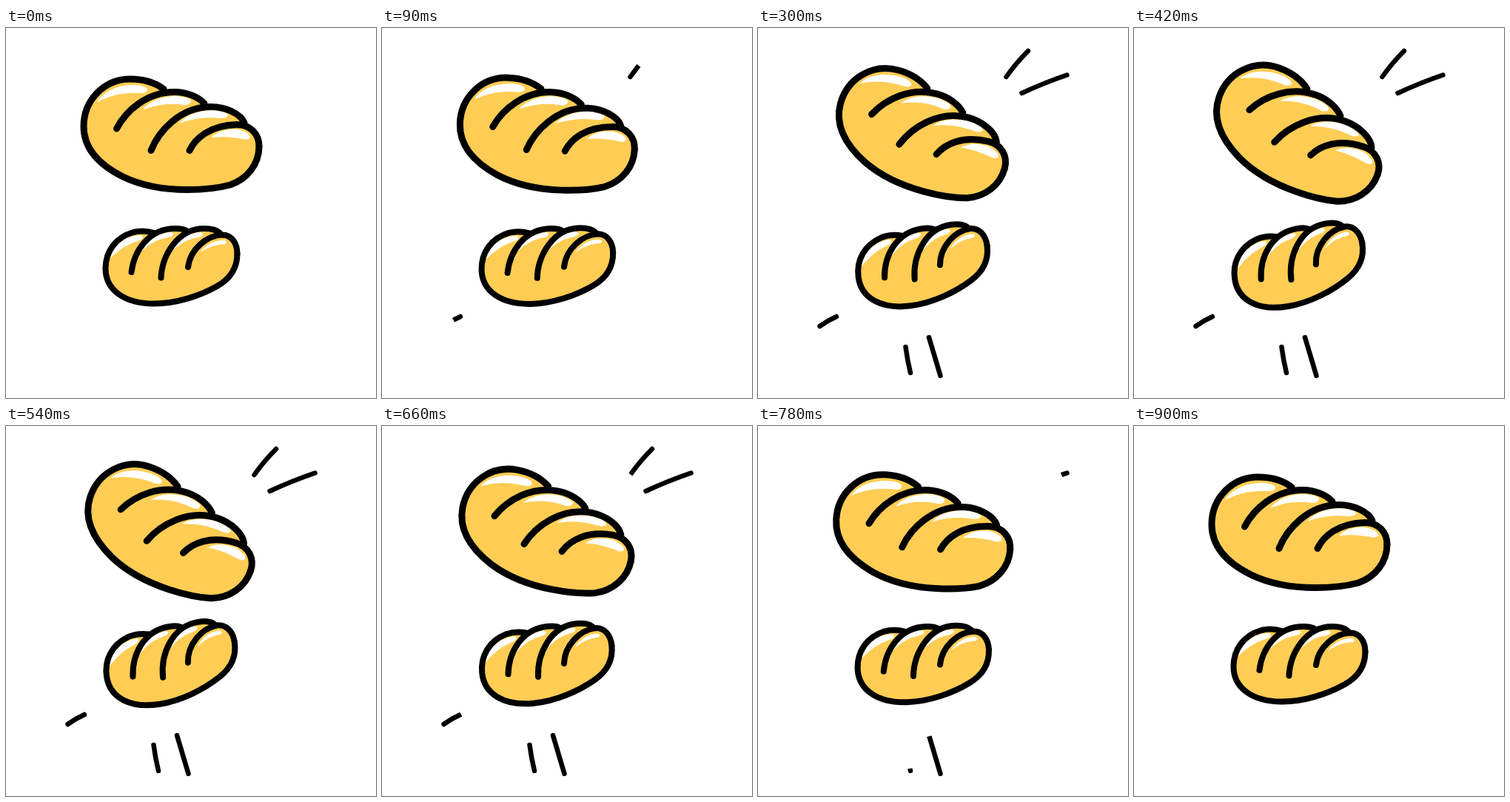
These frames come from a looping animation (500 px wide and 500 px high, 0.93 s). An HTML page with a canvas:

```html
<!DOCTYPE html>
<html lang="en">
<head>
<meta charset="utf-8">
<title>Bread</title>
<style>
  html, body { margin: 0; width: 100%; height: 100%; overflow: hidden; background: #fff; }
  canvas { display: block; width: 100vw; height: 100vh; }
</style>
</head>
<body>
<canvas id="stage" width="500" height="500"></canvas>
<script>
const ctx = document.getElementById('stage').getContext('2d');
const LOOP = 930, STEP = 30, SWING = 900;
const CRUST = '#ffcd54', INK = '#000';
const paths = list => list.map(d => new Path2D(d));

const loaves = [
  {
    center: [225, 142], turn: 20, line: 9,
    crust: paths([
      'M213 82.5C201 73.5 184 69 168 69C132 69 105 98 105 133C105 166 130 187 158 201C185 214 215 218.5 245 218.5C270 218.5 290 215.5 303 212C326 204 342 184 342 160',
      'M149.5 136C162 112 190 86.5 228 86.5C244 86.5 260 93 268 102',
      'M196 165.5C206 140 235 106.5 277 106.5C297 106.5 317 116 322 128',
      'M248 165.5C256 149 275 131.5 312 130.5C330 130.5 342 143 342 160'
    ]),
    shine: paths([
      'M123 100C133 84 153 77 174 77Q191 78 191 84Q190 88 182 88C160 87 144 90 123 100Z',
      'M184 111C194 98 212 92 230 92Q250 94 250 99Q249 104 241 104C222 101 204 103 184 111Z',
      'M234 129C244 117 262 111 280 111Q299 113 300 118Q299 122 290 122C271 120 253 122 234 129Z',
      'M277 148.5C286 139 300 136 313 137Q329 141 330 147Q329 151 323 150.5C309 148 293 146 277 148.5Z'
    ])
  },
  {
    center: [225, 322], turn: -10, line: 8,
    crust: paths([
      'M200 277C190 274 180 274 172 276C148 283 134.5 302 134.5 325C134.5 354 160 372.5 200 372.5C230 372.5 262 362 285 349C303 339 312.5 324 312.5 305',
      'M169.5 330C173 301 193 271 229 271C236 271 241 272 244 274',
      'M209.5 337.5C211 307 232 271 268 271C278 271 285 273 289 277',
      'M246 323C249 299 271 280 293 279.5C305 280 312.5 291 312.5 305'
    ]),
    shine: paths([
      'M141 311C145 294 160 281 181 280Q187 280 184 285C180 289 165 288 141 311Z',
      'M183 302C191 286 205 276 223 276Q229 278 223 282C214 285 202 284 183 302Z',
      'M225 301C233 285 247 276 263 276Q269 278 263 282C254 285 243 284 225 301Z',
      'M262 304C269 293 282 286 295 287Q300 289 296 292C287 293 277 293 262 304Z'
    ])
  }
];

// order sets when the dash is wiped in and out
const dashes = [
  { from: [335.5, 66], to: [365, 31], bend: -2, order: 0 },
  { from: [356.5, 88], to: [417.5, 63.5], bend: -1.7, order: 1 },
  { from: [106, 390], to: [83.5, 403], bend: 1.3, order: 0 },
  { from: [199.5, 431], to: [206, 466], bend: 1, order: 1 },
  { from: [231, 418], to: [246.5, 470], bend: 0, order: 2 }
];

const clamp = v => Math.min(1, Math.max(0, v));

function drawLoaf({ center: [x, y], turn, line, crust, shine }, swing) {
  ctx.save();
  ctx.translate(x, y);
  ctx.rotate(turn * swing * Math.PI / 180);
  ctx.translate(-x, -y);
  ctx.fillStyle = CRUST;
  crust.forEach(p => ctx.fill(p));
  ctx.fillStyle = '#fff';
  shine.forEach(p => ctx.fill(p));
  ctx.lineWidth = line;
  crust.forEach(p => ctx.stroke(p));
  ctx.restore();
}

function drawDash({ from, to, bend, order }, t) {
  const shown = clamp((t - 56 - 60 * order) / 80);
  const hidden = clamp((t - 654 - 60 * order) / 78);
  if (shown <= hidden) return;
  const dx = to[0] - from[0], dy = to[1] - from[1];
  const length = Math.hypot(dx, dy), cap = 3.4, span = length + 2 * cap;
  ctx.save();
  ctx.translate(...from);
  ctx.rotate(Math.atan2(dy, dx));
  ctx.beginPath();
  ctx.rect(span * hidden - cap, -10, span * (shown - hidden), 20);
  ctx.clip();
  ctx.beginPath();
  ctx.moveTo(0, 0);
  ctx.quadraticCurveTo(length / 2, bend, length, 0);
  ctx.lineWidth = 6.5;
  ctx.stroke();
  ctx.restore();
}

function draw(now) {
  const t = Math.floor(now % LOOP / STEP) * STEP;
  const swing = (1 - Math.cos(2 * Math.PI * t / SWING)) / 2;
  ctx.fillStyle = '#fff';
  ctx.fillRect(0, 0, 500, 500);
  ctx.strokeStyle = INK;
  ctx.lineCap = ctx.lineJoin = 'round';
  loaves.forEach(loaf => drawLoaf(loaf, swing));
  dashes.forEach(dash => drawDash(dash, t));
}

const start = performance.now();
function tick() {
  draw(performance.now() - start);
  requestAnimationFrame(tick);
}
tick();
</script>
</body>
</html>
```
